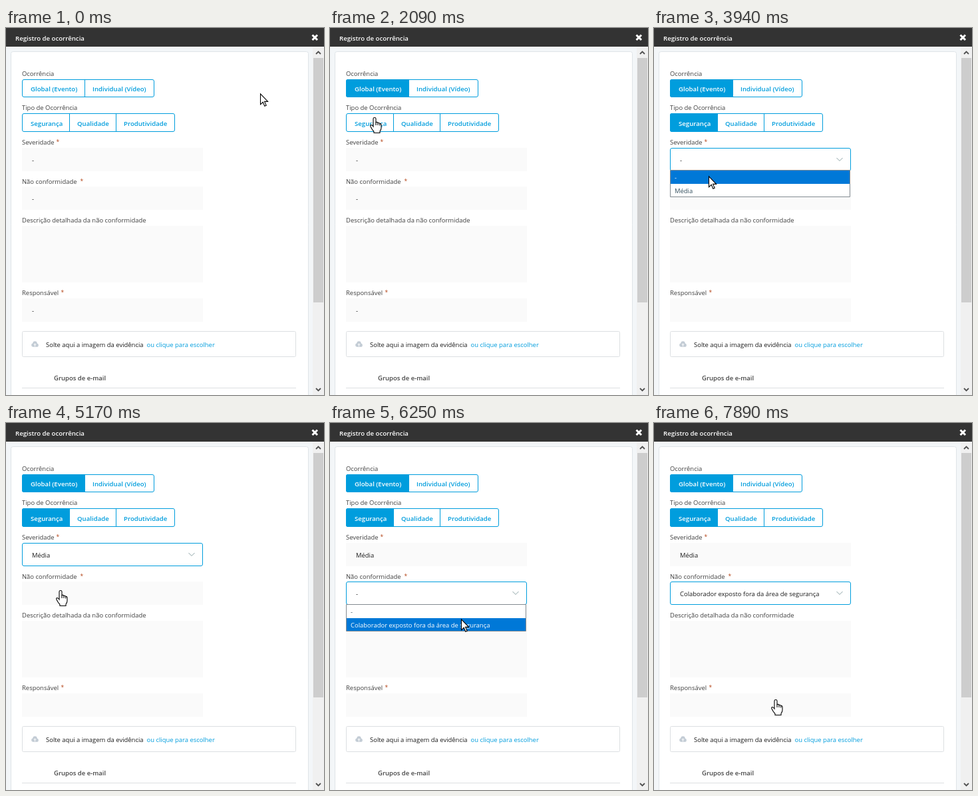
Write an HTML page with a canvas that moves like this. It is 478 px wide and 551 px high and loops after 8000 ms.

```html
<!DOCTYPE html>
<html lang="pt">
<head>
<meta charset="utf-8">
<title>Registro de ocorrência</title>
<style>
html, body { margin: 0; width: 478px; height: 551px; overflow: hidden; background: #f3f6f8; }
canvas { display: block; }
</style>
</head>
<body>
<canvas id="stage" width="478" height="551"></canvas>
<script>
const ctx = document.getElementById('stage').getContext('2d');
const LOOP = 8000;
const BLUE = '#009ddd', INK = '#1c1c1c', LABEL = '#404040', FIELD = '#fafafa', PICK = '#0078d7';
const TEXT = '9.45px "Open Sans", sans-serif';
const BOLD = '600 9.65px "Open Sans", sans-serif';

// Pointer moves: [start, end, steps, x, y, control x, control y]
const MOVES = [
  [80, 80, 1, 334, 88],
  [230, 230, 1, 333, 86],
  [550, 1090, 8, 75, 86, 190, 72],
  [1700, 2010, 5, 67, 131],
  [2090, 2090, 1, 67, 134],
  [2170, 2240, 2, 62, 137],
  [3090, 3390, 5, 82, 188],
  [3710, 3940, 4, 82, 222],
  [4020, 4100, 2, 75, 249],
  [4250, 4560, 5, 81, 242, 88, 228],
  [4940, 5170, 4, 82, 251, 91, 246],
  [5860, 6250, 6, 197, 294],
  [6320, 6630, 5, 252, 305, 235, 311],
  [7270, 7890, 9, 183, 415]
];

const HAND = new Path2D('M-2 2.2Q-2 .5 0 .5Q2 .5 2 2.2V7.6Q4 6.8 5 8.4Q7 7.7 7.8 9.4Q10 9.2 10 11.5V16Q10 18.6 8 21V23.5H-1V21.5Q-4 18.5-6 14Q-6.8 11.6-5 11.5Q-3.8 11.6-2 14Z');
const KNUCKLES = new Path2D('M2 7.6V12M5 8.4V12M7.8 9.4V12.4');
const ARROW = new Path2D('M.5 .8V16.8L4.2 13.3L6.8 19.3L9.2 18.3L6.6 12.4H11.6Z');
const BEAM = new Path2D('M-3.5-8.5H-1L0-7.5L1-8.5H3.5M0-7.5V7.5M-3.5 8.5H-1L0 7.5L1 8.5H3.5');

const clamp = v => Math.max(0, Math.min(1, v));
const inside = (p, x, y, r, b) => p.x >= x && p.x <= r && p.y >= y && p.y <= b;

function fill(x, y, w, h, color) {
  ctx.fillStyle = color;
  ctx.fillRect(x, y, w, h);
}

function box(x, y, w, h, radius, bg, border) {
  ctx.beginPath();
  ctx.roundRect(x + .5, y + .5, w - 1, h - 1, radius);
  ctx.fillStyle = bg;
  ctx.fill();
  ctx.lineWidth = 1;
  ctx.strokeStyle = border;
  ctx.stroke();
}

function line(color, width, ...points) {
  ctx.beginPath();
  for (let i = 0; i < points.length; i += 2) ctx.lineTo(points[i], points[i + 1]);
  ctx.lineWidth = width;
  ctx.strokeStyle = color;
  ctx.stroke();
}

function text(str, x, y, color = INK, font = TEXT) {
  ctx.font = font;
  ctx.fillStyle = color;
  ctx.fillText(str, x, y);
}

function pointerAt(t) {
  let x = 382, y = 98;
  for (const [start, end, steps, tx, ty, cx = (x + tx) / 2, cy = (y + ty) / 2] of MOVES) {
    if (t < start) break;
    const part = end > start ? clamp((t - start) / (end - start)) : 1;
    const k = (Math.floor(part * (steps - 1) + 1e-6) + 1) / steps;
    const a = (1 - k) ** 2, b = 2 * k * (1 - k), c = k * k;
    x = a * x + b * cx + c * tx;
    y = a * y + b * cy + c * ty;
  }
  return { x: Math.round(x), y: Math.round(y) };
}

function label(str, y, starX) {
  text(str, 24, y, LABEL);
  if (starX) text('*', starX, y - 1, '#b5481c', '8.4px "Open Sans", sans-serif');
}

function buttons(y, h, edges, names, active) {
  const left = edges[0], right = edges[edges.length - 1];
  box(left, y, right - left, h, 2.5, '#fff', BLUE);
  if (active > 0) {
    ctx.globalAlpha = active;
    ctx.beginPath();
    ctx.roundRect(left, y, edges[1] - left + 1, h, [3, 0, 0, 3]);
    ctx.fillStyle = BLUE;
    ctx.fill();
    ctx.globalAlpha = 1;
  }
  names.forEach((name, i) => {
    if (i) fill(edges[i], y, 1, h, BLUE);
    const color = !i && active > .5 ? '#fff' : BLUE;
    text(name, edges[i] + (i ? 12 : 13), Math.round(y + h / 2 + 4.5), color, BOLD);
  });
}

function select(y, value, focused) {
  if (focused) {
    box(24, y, 272, 35, 2.5, '#fff', BLUE);
    line('#8ba3a6', 1, 274.5, y + 15, 279, y + 19.5, 283.5, y + 15);
  } else {
    fill(24, y, 272, 35, FIELD);
  }
  text(value, 39, y + 22);
}

function list(y, options, picked) {
  box(24, y, 271, 41, 0, '#fff', '#838b91');
  fill(25, y + 1 + picked * 20, 269, 20 - picked, PICK);
  options.forEach((option, i) =>
    text(option, 31, y + 15 + i * 20, i === picked ? '#fff' : '#35505f'));
}

function chrome() {
  fill(0, 0, 478, 551, '#f3f6f8');
  box(7, 35, 448, 540, 3, '#fff', '#dfe4e8');
  fill(0, 0, 478, 28, '#333');
  text('Registro de ocorrência', 14, 19, '#fff', BOLD);
  line('#fff', 3, 460.5, 10.5, 468, 18);
  line('#fff', 3, 468, 10.5, 460.5, 18);
  fill(461, 28, 17, 523, '#f0f0f0');
  fill(462, 45, 15, 367, '#cdcdcd');
  line('#505050', 1.8, 466, 39, 469.5, 35.5, 473, 39);
  line('#505050', 1.8, 466, 541, 469.5, 544.5, 473, 541);
}

function upload() {
  box(24, 455, 412, 39, 2, '#fff', '#dcdfe2');
  ctx.fillStyle = '#c3ccd5';
  ctx.beginPath();
  ctx.arc(41, 476, 2.8, 0, 7);
  ctx.arc(43.5, 473.5, 3.2, 0, 7);
  ctx.arc(46.2, 476.2, 2.6, 0, 7);
  ctx.rect(41, 475, 5, 3.8);
  ctx.fill();
  line('#fff', 1, 43.5, 478, 43.5, 474);
  line('#fff', 1, 41.8, 475.6, 43.5, 473.9, 45.2, 475.6);
  text('Solte aqui a imagem da evidência', 60, 479);
  text('ou clique para escolher', 211.5, 479, BLUE);
  text('Grupos de e-mail', 72, 529, '#444', '600 9.5px "Open Sans", sans-serif');
  fill(24, 540, 412, 1, '#dcdfe2');
}

function pointer(p, listOpen) {
  const overHand = inside(p, 24, 77, 223, 104) || inside(p, 24, 128, 254, 156) ||
    [180, 238, 406].some(y => inside(p, 24, y, 296, y + 35));
  const overArea = inside(p, 24, 297, 296, 382);
  ctx.save();
  ctx.translate(p.x, p.y);
  ctx.lineWidth = 1.1;
  ctx.strokeStyle = '#000';
  ctx.fillStyle = '#fff';
  if (!listOpen && overArea) {
    ctx.translate(.5, .5);
    ctx.stroke(BEAM);
  } else {
    const hand = overHand && !listOpen;
    const shape = hand ? HAND : ARROW;
    ctx.fill(shape);
    ctx.stroke(shape);
    if (hand) ctx.stroke(KNUCKLES);
  }
  ctx.restore();
}

function draw(t) {
  const p = pointerAt(t);
  const fade = start => clamp(Math.floor((t - start) / 77 + 1) / 4);
  const firstList = t >= 3560 && t < 4710;
  const secondList = t >= 5400 && t < 6710;
  const cleared = t >= 2700;
  const issue = 'Colaborador exposto fora da área de segurança';

  chrome();
  label('Ocorrência', 72);
  buttons(77, 27, [24, 118, 223], ['Global (Evento)', 'Individual (Vídeo)'], fade(1320));
  label('Tipo de Ocorrência', 123);
  buttons(128, 28, [24, 95, 165, 254], ['Segurança', 'Qualidade', 'Produtividade'], fade(2560));

  label('Severidade', 175, 75.5);
  select(180, t >= 4710 ? 'Média' : cleared && !firstList ? '' : '-', t >= 3560 && t < 5400);
  label('Não conformidade', 234, 111.5);
  select(238, t >= 6710 ? issue : cleared && !secondList ? '' : '-', t >= 5400);
  label('Descrição detalhada da não conformidade', 292);
  fill(24, 297, 272, 85, FIELD);
  label('Responsável', 401, 82.5);
  select(406, cleared ? '' : '-', false);
  upload();

  if (firstList) list(213, ['-', 'Média'], p.y >= 234 ? 1 : 0);
  if (secondList) list(272, ['-', issue], p.y >= 293 ? 1 : 0);
  pointer(p, firstList || secondList);
}

const began = performance.now();
function tick() {
  draw((performance.now() - began) % LOOP);
  requestAnimationFrame(tick);
}
tick();
</script>
</body>
</html>
```
